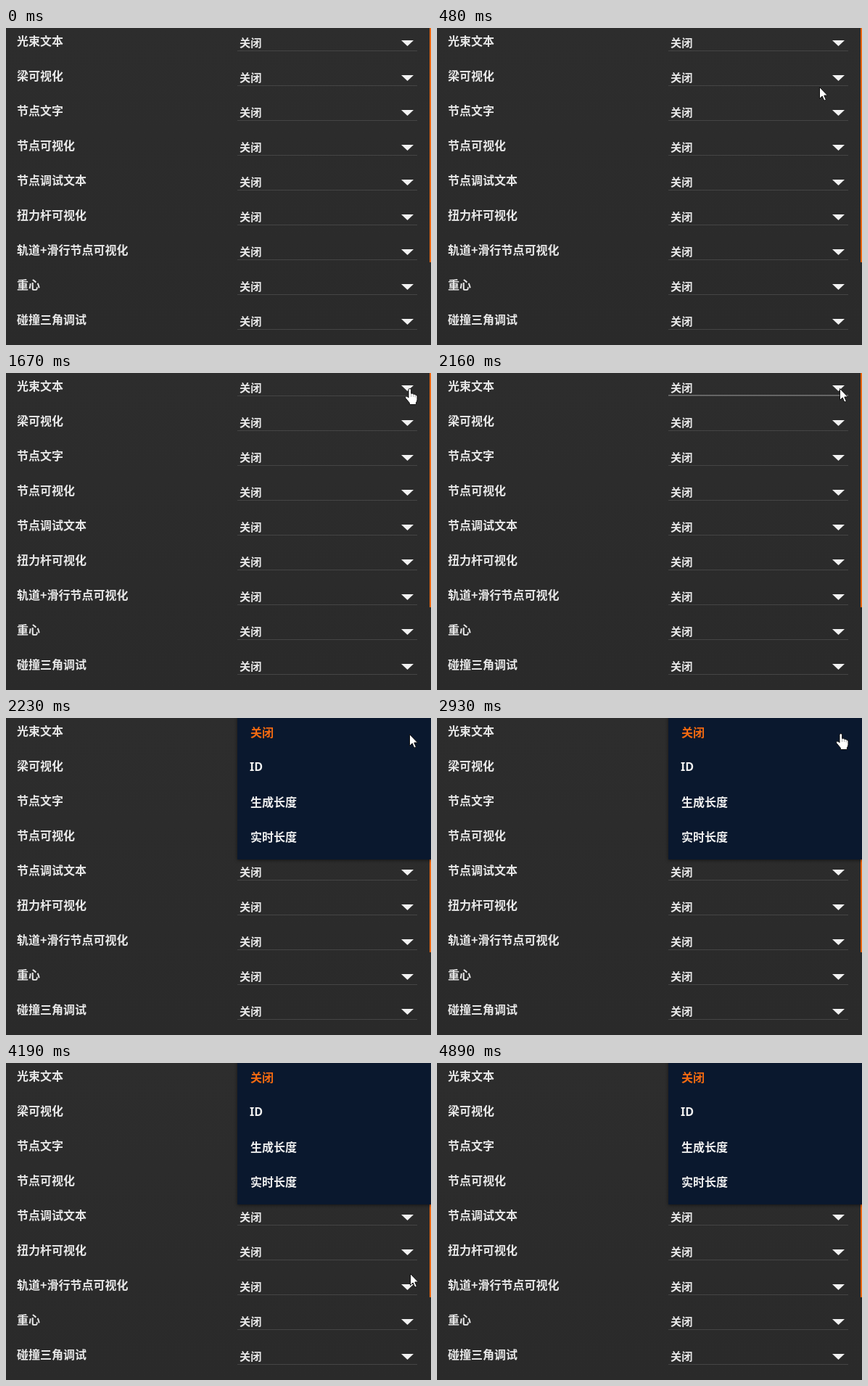
An HTML page that plays this animation: 586 by 437 pixels, repeating every 4960 ms.

```html
<!DOCTYPE html>
<html lang="zh-CN">
<head>
<meta charset="utf-8">
<style>
html, body { margin: 0; width: 100%; height: 100%; overflow: hidden; background: #2b2b2b; }
svg { display: block; width: 586px; height: 437px; }
text { font: 700 16px "Noto Sans CJK SC", "Noto Sans CJK", "Noto Sans", sans-serif; fill: #e8e8e8; }
#rows .value { font-size: 15.2px; }
#menu text { fill: #f0f0f0; }
#menu .on { fill: #f26a11; }
#menu .latin { font: 600 16px "Noto Sans", "Open Sans", sans-serif; }
#panel { filter: drop-shadow(0 1px 2px rgba(0, 0, 0, .55)); }
#arrow, #hand { fill: #fff; stroke: #111; stroke-width: 1; stroke-linejoin: round; }
</style>
</head>
<body>
<svg viewBox="0 0 586 437">
  <defs>
    <linearGradient id="bg" x1="0" y1="0" x2="0" y2="1">
      <stop offset="0" stop-color="#2d2d2d"/>
      <stop offset="1" stop-color="#2a2a2a"/>
    </linearGradient>
  </defs>
  <rect width="586" height="437" fill="url(#bg)"/>
  <rect x="584" width="2" height="323" fill="#e8640f"/>
  <g id="rows"></g>
  <rect id="focus" x="319" y="30" width="248" height="1.5" fill="#707070"/>
  <g id="menu">
    <rect id="panel" x="319" y="-4" width="271" height="199" fill="#0a182e"/>
  </g>
  <g id="cursor">
    <path id="arrow" d="M.5 .5V16.5L4.2 13 6.8 19.2 9.4 18 6.8 12H11.5Z"/>
    <g id="hand">
      <path d="M5 13V2.2Q5 .5 6.8 .5T8.6 2.2V7.4Q10.6 6.4 11.7 8.2 13.6 7.4 14.4 9.1 17 8.6 17 11.4V15.5Q17 18 15.4 20V22.5H6.4V20.3L.8 13.6Q0 11.4 1.8 11 3 10.8 5 13Z"/>
      <path d="M8.6 7.6V12M11.7 8.6V12M14.4 9.5V12.5" fill="none" stroke="#999" stroke-width=".8"/>
    </g>
  </g>
</svg>
<script>
const LOOP = 4960, PITCH = 48;
const PRESS = 2160, OPEN = 2230;
const labels = ["光束文本", "梁可视化", "节点文字", "节点可视化", "节点调试文本",
  "扭力杆可视化", "轨道+滑行节点可视化", "重心", "碰撞三角调试"];
const options = ["关闭", "ID", "生成长度", "实时长度"];

// Pointer steps: time, x, y, shape
const steps = [
  [0, 0, 0, ""],
  [140, 497, 413, "arrow"], [210, 502, 362, "arrow"], [280, 508, 295, "arrow"],
  [340, 514, 220, "arrow"], [410, 520, 146, "arrow"], [480, 527, 81, "arrow"],
  [550, 543, 26, "arrow"], [630, 552, 19, "hand"], [690, 556, 21, "hand"],
  [1250, 553, 21, "hand"], [1320, 550, 21, "hand"],
  [PRESS, 555, 21, "arrow"], [OPEN, 556, 22, "arrow"], [2300, 550, 21, "hand"],
  [3840, 550, 36, "hand"], [3910, 550, 88, "hand"], [3980, 550, 118, "hand"],
  [4050, 551, 170, "hand"], [4120, 557, 230, "arrow"], [4190, 557, 290, "arrow"],
  [4260, 557, 344, "arrow"], [4330, 557, 388, "arrow"], [4400, 557, 415, "arrow"],
  [4470, 557, 428, "arrow"], [4540, 0, 0, ""]
];

const $ = id => document.getElementById(id);

function add(parent, tag, attrs, text = "") {
  const el = document.createElementNS("http://www.w3.org/2000/svg", tag);
  for (const key in attrs) el.setAttribute(key, attrs[key]);
  el.textContent = text;
  parent.append(el);
}

labels.forEach((label, i) => {
  const y = i * PITCH, rows = $("rows");
  add(rows, "text", { x: 15, y: y + 24 }, label);
  add(rows, "text", { x: 322, y: y + 26, class: "value" }, "关闭");
  add(rows, "path", { d: `M545 ${y + 17}h17l-8.5 8z`, fill: "#f2f2f2" });
  add(rows, "rect", { x: 319, y: y + 31, width: 248, height: 1, fill: "#454545" });
});

options.forEach((name, i) => add($("menu"), "text", {
  x: i === 1 ? 336 : 337,
  y: i * PITCH + (i === 1 ? 25 : 26),
  class: ["on", "latin"][i] || ""
}, name));

const show = (id, on) => { $(id).style.visibility = on ? "visible" : "hidden"; };

function draw(t) {
  const [, x, y, shape] = steps.findLast(s => s[0] <= t);
  $("cursor").setAttribute("transform", `translate(${x} ${y})`);
  show("arrow", shape === "arrow");
  show("hand", shape === "hand");
  show("focus", t >= PRESS && t < OPEN);
  show("menu", t >= OPEN);
}

const start = performance.now();
function tick() {
  draw((performance.now() - start) % LOOP);
  requestAnimationFrame(tick);
}
tick();
</script>
</body>
</html>
```
